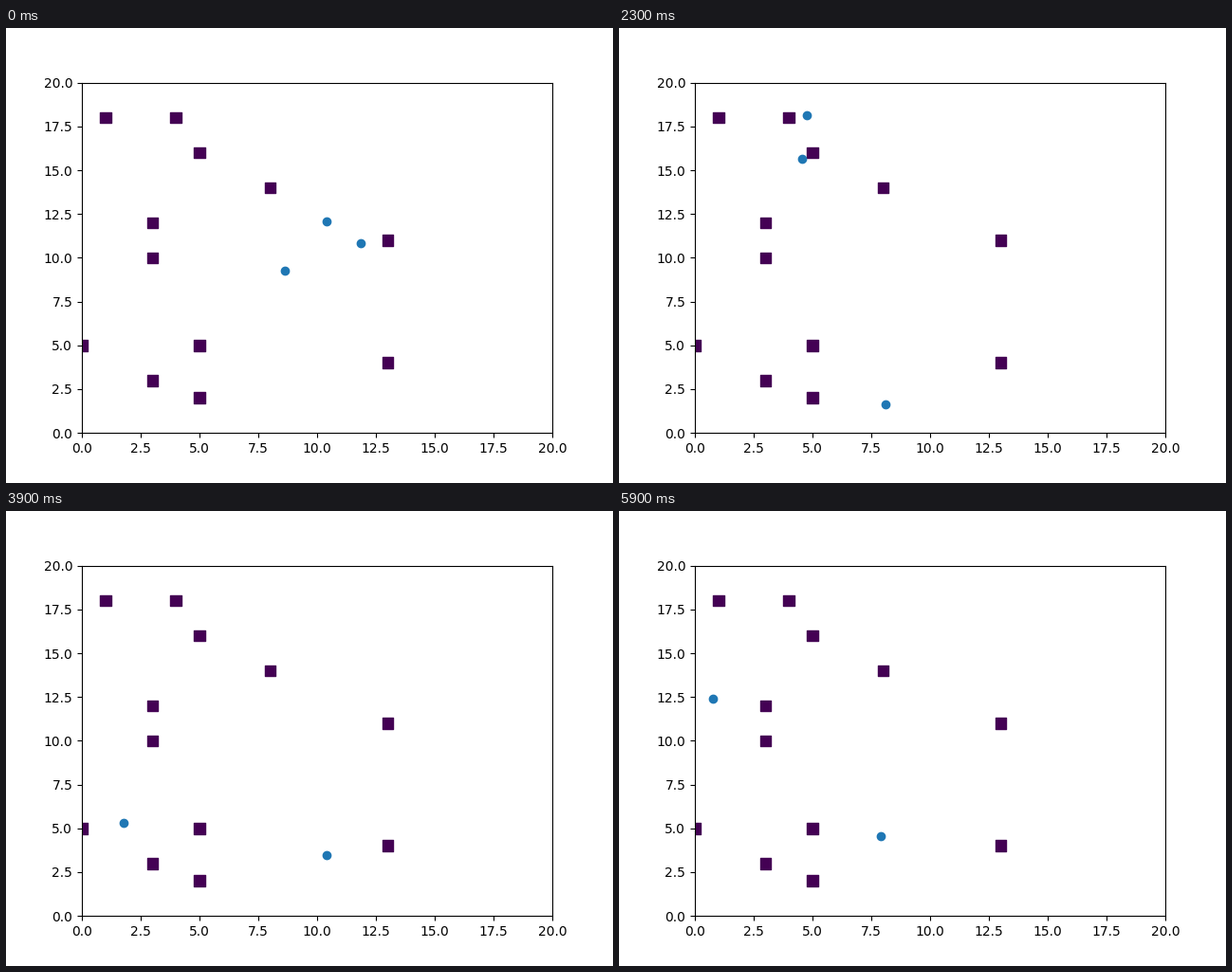
Recreate the animation shown at these times as a matplotlib script. Size 640 by 480 pixels, loop 6000 ms.

```python
import numpy as np
import matplotlib.pyplot as plt
from matplotlib.animation import FuncAnimation

FRAMES = 60
INTERVAL = 100
SIZE = 20
FLOOR = 0.2

obstacles = np.array([
    (1, 18), (4, 18), (5, 16), (8, 14), (3, 12), (3, 10),
    (13, 11), (0, 5), (5, 5), (3, 3), (5, 2), (13, 4),
])

# Turning points (step, x, y); heights below FLOOR are mirrored back up.
routes = [
    [(0, 11.86, 10.84), (4, 13.83, 10.94), (13, 7.54, 13.65),
     (21, 4.07, 15.54), (23, 4.56, 15.65), (33, 3.75, 10.13),
     (42, 0.77, 2.94), (45, 0.77, 1.20), (59, 0.77, -12.01)],
    # waits from step 7 to 14, leaves through the left side at the end
    [(0, 10.40, 12.08), (7, 8.47, 16.68), (14, 8.47, 16.68),
     (23, 4.76, 18.14), (28, 3.47, 18.58), (33, 0.56, 17.60),
     (34, -1.20, 17.50)],
    [(0, 8.63, 9.27), (5, 4.03, 8.18), (13, 7.42, 6.02),
     (23, 8.11, -1.24), (33, 13.83, -3.46), (35, 13.83, -3.46),
     (45, 5.24, -2.48), (52, 4.72, 0.61), (59, 7.90, 4.56)],
]


def position(route, step):
    """Walk straight between turning points and bounce off the floor."""
    t, x, y = np.transpose(route)
    height = np.interp(step, t, y)
    return np.interp(step, t, x), FLOOR + abs(height - FLOOR)


fig, ax = plt.subplots(figsize=(6.4, 4.8), dpi=100)
ax.set_xlim(0, SIZE)
ax.set_ylim(0, SIZE)
ax.scatter(*obstacles.T, s=70, marker="s", c=np.zeros(len(obstacles)))
dots, = ax.plot([], [], "o", color="C0")


def update(step):
    dots.set_data(*zip(*(position(r, step) for r in routes)))
    return dots,


anim = FuncAnimation(fig, update, frames=FRAMES, interval=INTERVAL,
                     repeat=True, repeat_delay=0)
plt.show()
```
